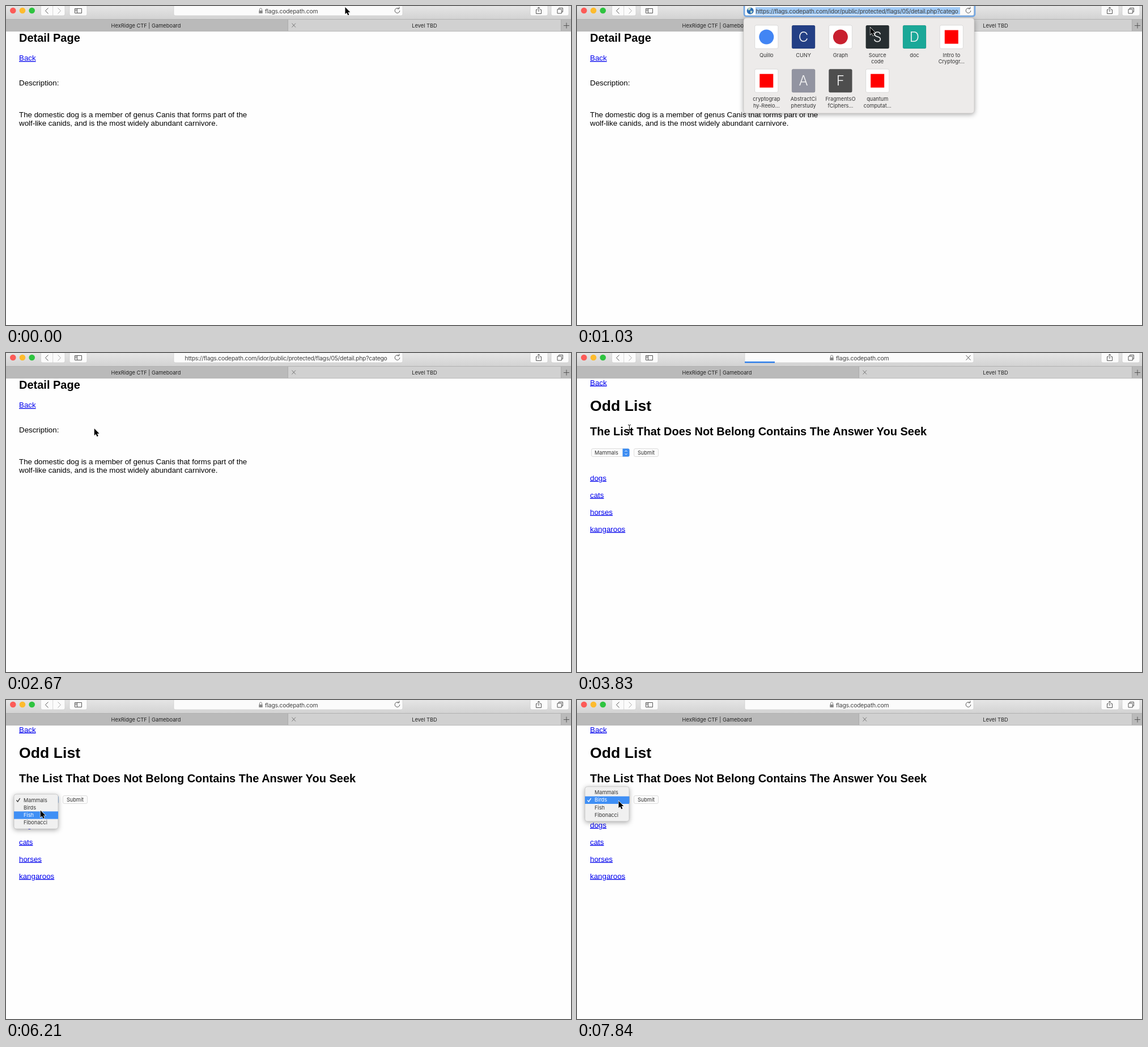
An HTML page for the animation above (8 s loop, 997x562 px).

```html
<!DOCTYPE html>
<html lang="en">
<meta charset="utf-8">
<title>Odd list</title>
<style>
  html, body { margin: 0; height: 100%; overflow: hidden; background: #fefefe; }
  svg { display: block; }
  text { white-space: pre; }
  .page text { font: 13.33px "Liberation Sans", Arial, sans-serif; }
  .page .h1 { font-size: 26.66px; font-weight: bold; }
  .page .h2 { font-size: 20px; font-weight: bold; }
  .page .link { fill: #00e; text-decoration: underline; }
  .ui, .page .ui { font: 9.2px Inter, sans-serif; fill: #333; }
  .tab { font-size: 9.3px; fill: #222; }
  .mid { text-anchor: middle; }
  .url { font: 10.4px Inter, sans-serif; letter-spacing: -.25px; fill: #444; }
  .letter { font: 300 24px Inter, sans-serif; fill: #f4f4f4; text-anchor: middle; }
  .button { fill: #fbfbfb; stroke: #c8c8c8; stroke-width: .6; }
  .icon { fill: none; stroke: #555; stroke-width: 1; }
  .panel { filter: drop-shadow(0 2px 4px #0005); }
</style>
<svg width="997" height="562" viewBox="0 0 997 562">
  <defs>
    <linearGradient id="bar" x2="0" y2="1">
      <stop stop-color="#e5e5e5"/><stop offset="1" stop-color="#d2d2d2"/>
    </linearGradient>
    <clipPath id="field"><path d="M314 0h363v18h-363z"/></clipPath>
  </defs>

  <g class="page" id="detail">
    <text class="h2" x="23" y="63">Detail Page</text>
    <text class="link" x="23" y="96">Back</text>
    <text x="23" y="140">Description:</text>
    <text x="23" y="196">The domestic dog is a member of genus Canis that forms part of the</text>
    <text x="23" y="211">wolf-like canids, and is the most widely abundant carnivore.</text>
  </g>

  <g class="page" id="list">
    <text class="link" x="23" y="56.5">Back</text>
    <text class="h1" x="23" y="102">Odd List</text>
    <text class="h2" x="23" y="145">The List That Does Not Belong Contains The Answer You Seek</text>
    <rect class="button" x="25.5" y="168.5" width="67" height="14" rx="2.5"/>
    <path d="M80.5 168.5h9.5q2.5 0 2.5 2.5v9q0 2.5-2.5 2.5h-9.5z" fill="#3b8cf2"/>
    <path d="M84.500 174l2-2.200 2 2.200m-4 3l2 2.200 2-2.200" fill="none" stroke="#fff"/>
    <text class="ui" id="choice" x="31" y="179"></text>
    <rect class="button" x="100.500" y="168.500" width="43" height="14" rx="2.500"/>
    <text class="ui mid" x="122" y="179">Submit</text>
    <text class="link" x="23" y="224.500">dogs</text>
    <text class="link" x="23" y="254.500">cats</text>
    <text class="link" x="23" y="284.500">horses</text>
    <text class="link" x="23" y="314.500">kangaroos</text>
  </g>

  <g id="menu">
    <rect class="panel" x="14" y="166" width="78" height="61" rx="4" fill="#f0f0f0" stroke="#bbb" stroke-width=".6"/>
    <rect id="highlight" x="14" width="78" height="13.300" fill="#3f8ff5"/>
    <path id="check" d="M18.500 176.500l2.200 2.700 4-6" fill="none" stroke-width="1.300"/>
    <g id="options"></g>
  </g>

  <g id="chrome">
    <path d="M0 0h997v24H0z" fill="url(#bar)"/>
    <path d="M0 24h997v20H0z" fill="#bababa"/>
    <path d="M498 24h481v20H498z" fill="#d1d1d1"/>
    <path d="M0 23.500h997M0 44.500h997M497.500 24v20M979.500 24v20" stroke="#a9a9a9" stroke-width=".8"/>
    <circle cx="12.300" cy="8" r="5.300" fill="#fc5b57"/>
    <circle cx="29" cy="8" r="5.300" fill="#fdbb2e"/>
    <circle cx="45.700" cy="8" r="5.300" fill="#2fc440"/>
    <rect class="button" x="61.500" y="-4" width="42.500" height="21" rx="3"/>
    <rect class="button" x="112" y="-4" width="31" height="21" rx="3"/>
    <rect class="button" x="296" y="-4" width="404" height="21" rx="3"/>
    <rect class="button" x="925" y="-4" width="31" height="21" rx="3"/>
    <rect class="button" x="962" y="-4" width="31" height="21" rx="3"/>
    <path d="M82.700 0v17" stroke="#ccc" stroke-width=".8"/>
    <path class="icon" d="M74.500 3.500l-5 5 5 5" stroke-width="1.300"/>
    <path class="icon" d="M91.500 3.500l5 5-5 5" style="stroke:#aaa"/>
    <path class="icon" d="M121.500 4.500h12v8h-12zM125.500 4.500v8M122.500 6.500h2m-2 2h2"/>
    <path class="icon" id="share" d="M938 6.500h-2.500v7h9v-7H942M940 10V2m-2.500 2.500L940 2l2.500 2.500"/>
    <path class="icon" d="M975.500 5.500v-2h7v7h-2M973 5.800h7.300v7.200H973z"/>
    <path class="icon" d="M504.500 30.500l6.500 7m0-7l-6.500 7" style="stroke:#777"/>
    <path class="icon" d="M984 34.500h10m-5-5v10"/>
    <text class="ui tab mid" x="247" y="37.500">HexRidge CTF | Gameboard</text>
    <text class="ui tab mid" x="738.500" y="37.500">Level TBD</text>
    <path id="progress" fill="#2f7fea"/>
    <path class="icon" id="reload" d="M693 4.600a4.300 4.300 0 1 0 1.800 3.600M690.500 4.900h3.300V1.600"/>
    <path class="icon" id="stop" d="M686.500 4l8 8.500m0-8.500l-8 8.500"/>
    <g id="site">
      <path d="M446.300 8h6.400v5h-6.400z" fill="#888"/>
      <path d="M447.500 8V6a2 2 0 0 1 4 0v2" fill="none" stroke="#888"/>
      <text class="url" x="457" y="12.500">flags.codepath.com</text>
    </g>
  </g>

  <g id="favorites">
    <rect class="panel" x="294" y="21" width="407" height="168" rx="5" fill="#edebea" stroke="#c4c2c1" stroke-width=".7"/>
  </g>
  <g id="focus">
    <rect x="295" y="-4" width="407" height="22" rx="3.500" fill="none" stroke="#6ea4e2" stroke-width="2.500"/>
    <circle cx="305.700" cy="8.500" r="6" fill="#2b6cb3"/>
    <path d="M301 5q3-4 6-2l-1 3-3 2zM306 8l4 1-2 4-2-1z" fill="#bcd8c8"/>
  </g>
  <path id="selection" d="M315 2h361v13H315z" fill="#a0caf6"/>
  <text class="url" id="address" y="12.500" clip-path="url(#field)"></text>

  <g id="cursor">
    <path id="arrow" d="M0 0v12.300l2.800-2.600 2 4.500 2.100-.9-1.900-4.400h3.800z" stroke="#fff" stroke-width="1.200" paint-order="stroke"/>
    <path id="beam" d="M-2.500-6.500Q0-6.500 0-4.500 0-6.500 2.500-6.500M0-4.500V5M-2.500 7Q0 7 0 5 0 7 2.500 7M-1.500 2h3" fill="none" stroke="#222" stroke-width="1.100"/>
  </g>
</svg>
<script>
const LOOP = 8000, ROW = 13.3;
const $ = id => document.getElementById(id);
const show = (id, on) => $(id).style.display = on ? '' : 'none';
const during = (t, from, to) => t >= from && t < to;
// Latest [time, ...values] entry reached at t.
const held = (keys, t) => keys.filter(k => k[0] <= t).pop().slice(1);

const animals = ['Mammals', 'Birds', 'Fish', 'Fibonacci'];
$('options').innerHTML = animals.map((name, i) =>
  `<text class="ui" x="31" y="${179.5 + i * ROW}">${name}</text>`).join('');

// Tile colour, letter or shape, then label lines.
const tiles = [
  ['#fff', '#4285f4 circle', 'Quillo'],
  ['#233f85', 'C', 'CUNY'],
  ['#fff', '#c8202f circle', 'Graph'],
  ['#272e31', 'S', 'Source', 'code'],
  ['#1ba898', 'D', 'doc'],
  ['#fff', '#f00 square', 'Intro to', 'Cryptogr...'],
  ['#fff', '#f00 square', 'cryptograp', 'hy-Reelo...'],
  ['#9294a1', 'A', 'AbstractCi', 'pherstudy'],
  ['#4e4e4e', 'F', 'FragmentsO', 'fCiphers...'],
  ['#fff', '#f00 square', 'quantum', 'computat...']
];
function tile([back, face, ...label], i) {
  const x = 334.3 + i % 6 * 65.3, y = i < 6 ? 54.5 : 131.7;
  const [color, shape] = face.split(' ');
  const art = shape === 'circle' ? `<circle cx="${x}" cy="${y}" r="13" fill="${color}"/>`
    : shape ? `<rect x="${x - 12}" y="${y - 12}" width="24" height="24" fill="${color}"/>`
    : `<text class="letter" x="${x}" y="${y + 8.7}">${face}</text>`;
  return `<rect x="${x - 20.5}" y="${y - 20.5}" width="41" height="41" rx="2.5" fill="${back}" stroke="#0002" stroke-width=".8"/>${art}`
    + label.map((line, n) => `<text class="ui mid" x="${x}" y="${y + 35.3 + n * 11.6}">${line}</text>`).join('');
}
$('favorites').innerHTML += tiles.map(tile).join('');

const path = 'https://flags.codepath.com/idor/public/protected/flags/05/detail.php?catego';
const pointer = [
  [0, 598.5, 2], [150, 597, 5], [443, 585, 10], [590, 556, 21], [737, 530, 32], [883, 519, 37],
  [1030, 517.5, 38], [2070, 430, 76], [2220, 265, 115], [2370, 175, 131], [2520, 156.8, 134],
  [2670, 155.8, 133], [2810, 125, 122], [2960, 68, 100], [3110, 46, 89], [3396, 50, 92],
  [3541, 68, 110], [3687, 88, 128], [3830, 92.5, 133], [3980, 86, 154], [4125, 76, 170],
  [4270, 72.5, 173], [4870, 73.5, 174], [5610, 63, 199], [5760, 65, 187], [6210, 60.8, 194.5],
  [6360, 66, 187], [6510, 72, 180], [6810, 73.5, 178]
];
const highlights = [[0, 0], [5610, 2], [5760, 1], [6210, 2], [6360, 1], [6810, -1], [6956, 1]];
const menuOpacity = [[0, 0], [5310, 1], [7102, .6], [7248, .2], [7394, 0], [7840, 1]];
const endings = [[0, ''], [1470, 'ry=0&value=1'], [1620, 'ry=0&value='], [1770, 'ry=0&value=0'], [2670, '']];
const loaded = [[0, 0], [3250, 40], [3830, 53], [3980, 300], [4125, 404], [4270, 0]];

function draw(t) {
  const onList = t >= 3541, editing = during(t, 150, 2670), loading = during(t, 3250, 4125);
  show('detail', !onList);
  show('list', onList);
  show('site', t < 150 || t >= 3250);
  show('focus', editing);
  show('favorites', during(t, 297, 2670));
  show('selection', during(t, 150, 1470));
  show('reload', !loading);
  show('stop', loading);
  $('share').style.stroke = during(t, 3250, 3541) ? '#aaa' : '';
  $('progress').setAttribute('d', `M296 15h${held(loaded, t)}v2.5H296z`);

  const [ending] = held(endings, t), address = $('address');
  show('address', during(t, 150, 3250));
  address.textContent = path + ending;
  address.setAttribute('x', ending ? 674 : 315.5);
  address.setAttribute('text-anchor', ending ? 'end' : 'start');

  const chosen = t >= 7102 ? 1 : 0, checked = t >= 7840 ? 1 : 0;
  const [lit] = held(highlights, t);
  $('choice').textContent = animals[chosen];
  $('menu').style.opacity = held(menuOpacity, t);
  $('menu').setAttribute('transform', `translate(0 ${-checked * ROW})`);
  show('highlight', lit >= 0);
  $('highlight').setAttribute('y', 169.7 + lit * ROW);
  $('check').setAttribute('transform', `translate(0 ${checked * ROW})`);
  $('check').setAttribute('stroke', lit === checked ? '#fff' : '#333');
  [...$('options').children].forEach((option, i) => option.style.fill = i === lit ? '#fff' : '');

  const [x, y] = held(pointer, t), overText = during(t, 3687, 3980);
  $('cursor').setAttribute('transform', `translate(${x} ${y})`);
  show('arrow', !overText);
  show('beam', overText);
}

function frame(now) {
  draw(now % LOOP);
  requestAnimationFrame(frame);
}
frame(0);
</script>
</html>
```
